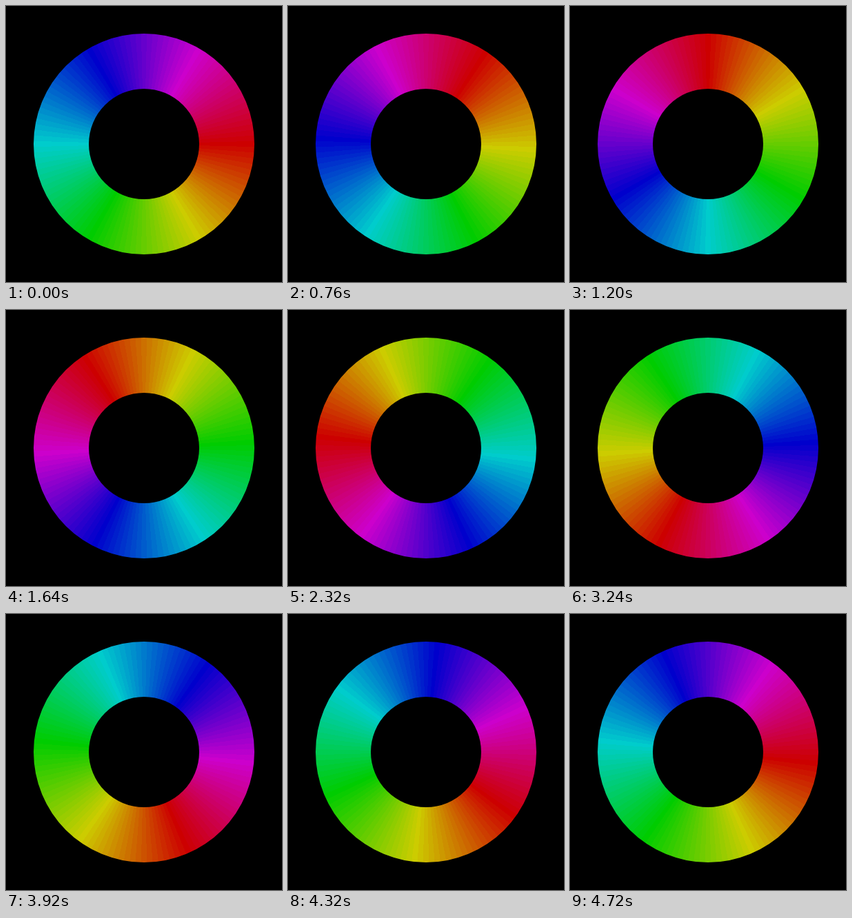
An HTML page with a canvas that plays this animation: 400 by 400 pixels, repeating every 4760 ms.

```html
<!DOCTYPE html>
<html lang="en">
<head>
<meta charset="utf-8">
<title>Colour wheel</title>
<style>
  html, body { margin: 0; width: 100%; height: 100%; overflow: hidden; background: #000; }
  canvas { display: block; }
</style>
</head>
<body>
<canvas id="wheel" width="400" height="400"></canvas>
<script>
const ctx = document.getElementById('wheel').getContext('2d');
const CENTER = 200, OUTER = 160, INNER = 80;
const WEDGES = 120, STEP = 2 * Math.PI / WEDGES;
const TICK = 40, TICKS = 119;

// One hard-edged wedge per hue, the first centred on the start angle.
function wheelFill(angle) {
  const fill = ctx.createConicGradient(angle - STEP / 2, CENTER, CENTER);
  for (let i = 0; i < WEDGES; i++) {
    const color = `hsl(${i * 360 / WEDGES}, 100%, 40%)`;
    fill.addColorStop(i / WEDGES, color);
    fill.addColorStop((i + 1) / WEDGES, color);
  }
  return fill;
}

function draw(tick) {
  ctx.fillStyle = '#000';
  ctx.fillRect(0, 0, 400, 400);
  ctx.beginPath();
  ctx.arc(CENTER, CENTER, OUTER, 0, 2 * Math.PI);
  ctx.closePath();
  ctx.moveTo(CENTER + INNER, CENTER);
  ctx.arc(CENTER, CENTER, INNER, 0, 2 * Math.PI);
  ctx.fillStyle = wheelFill(-tick * STEP);
  ctx.fill('evenodd');
}

const start = performance.now();
let shown = 0;

function frame() {
  const tick = Math.floor((performance.now() - start) / TICK) % TICKS;
  if (tick !== shown) draw(shown = tick);
  requestAnimationFrame(frame);
}

draw(0);
requestAnimationFrame(frame);
</script>
</body>
</html>
```
